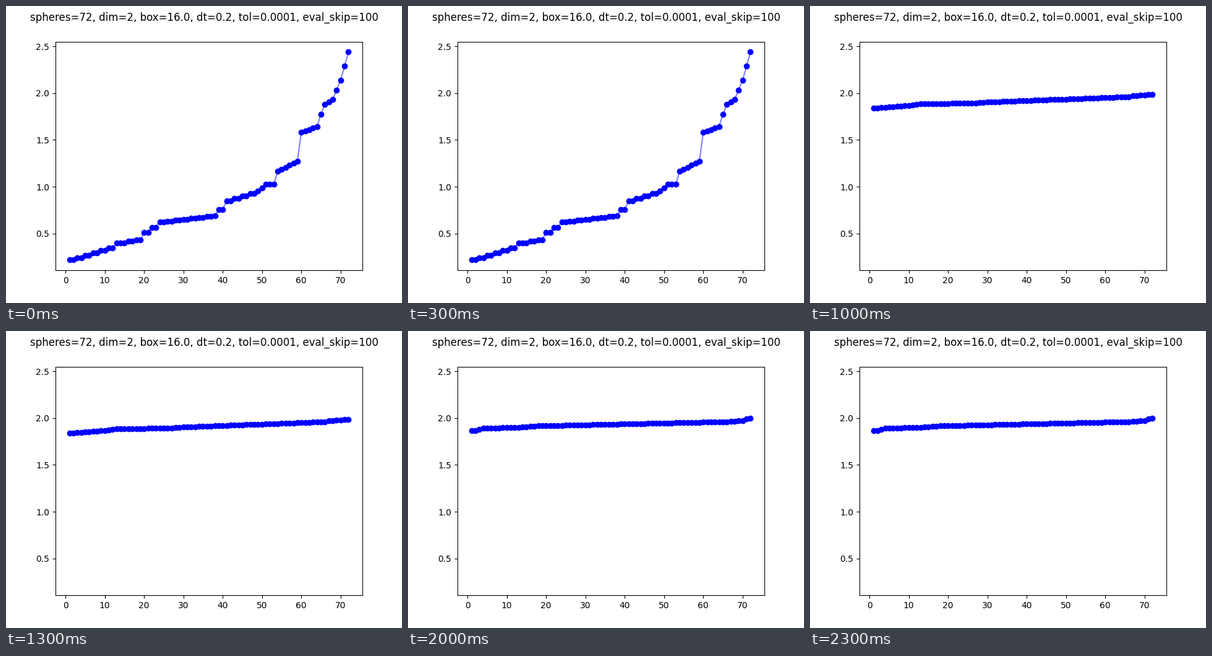
Recreate the animation shown at these times as a matplotlib script. Size 640 px wide and 480 px high, loop 2500 ms.

```python
import numpy as np
import matplotlib.pyplot as plt
from matplotlib.animation import FuncAnimation

COUNT = 72
LOW, HIGH = 0.218, 2.438                      # data range of the first state
PAD = 0.05 * (HIGH - LOW)
AXES_BOTTOM, AXES_HEIGHT = 427.2, 369.6
STEP = (HIGH - LOW + 2 * PAD) / AXES_HEIGHT   # data units per pixel

x = np.arange(1, COUNT + 1)


def curve(*points, at=x):
    """Data values along straight pieces through (index, pixel height) points."""
    index, height = zip(*points)
    return LOW - PAD + (AXES_BOTTOM - np.interp(at, index, height)) * STEP


# Mutual neighbours share one distance, so the lower part rises in pairs.
leads = np.r_[1:14:2, 16:39:2, 39:50:2, 50:COUNT + 1]
paired = leads[np.searchsorted(leads, x, side="right") - 1]

states = [
    curve((1, 410.4), (11, 391), (13, 383), (18, 378), (20, 366), (24, 349),
          (38, 339), (39, 329), (41, 315), (49, 299), (51, 288), (53, 288),
          (54, 267), (59, 251), (60, 204), (64, 195), (65, 175), (66, 159),
          (68, 151), (70, 120), (72, 74.4), at=paired),
    curve((1, 168.4), (8, 166.7), (9, 165.4), (15, 162.4), (40, 156.1),
          (41, 154.4), (68, 147.8), (69, 146.4), (72, 144.4)),
    curve((1, 165.4), (10, 160.8), (13, 158.4), (27, 156.6), (30, 155.4),
          (66, 146.6), (67, 145.4), (72, 142.7)),
    curve((1, 162.4), (4, 160.8), (5, 158.4), (19, 155.4), (32, 154.6),
          (34, 153.4), (67, 145.7), (71, 142.9), (72, 141)),
    curve((1, 161.3), (2, 160.7), (4, 157.4), (13, 155.6), (18, 153.4),
          (66, 146.6), (70, 144.8), (71, 142.2), (72, 141)),
]

fig, ax = plt.subplots(figsize=(6.4, 4.8), dpi=100)
fig.suptitle("spheres=72, dim=2, box=16.0, dt=0.2, tol=0.0001, eval_skip=100")
line, = ax.plot(x, states[0], "b-", alpha=0.5)
dots, = ax.plot(x, states[0], "bo")
ax.set_ylim(LOW - PAD, HIGH + PAD)


def draw(frame):
    for artist in (line, dots):
        artist.set_ydata(states[frame])
    return line, dots


anim = FuncAnimation(fig, draw, frames=len(states), interval=500, repeat=True)
plt.show()
```
